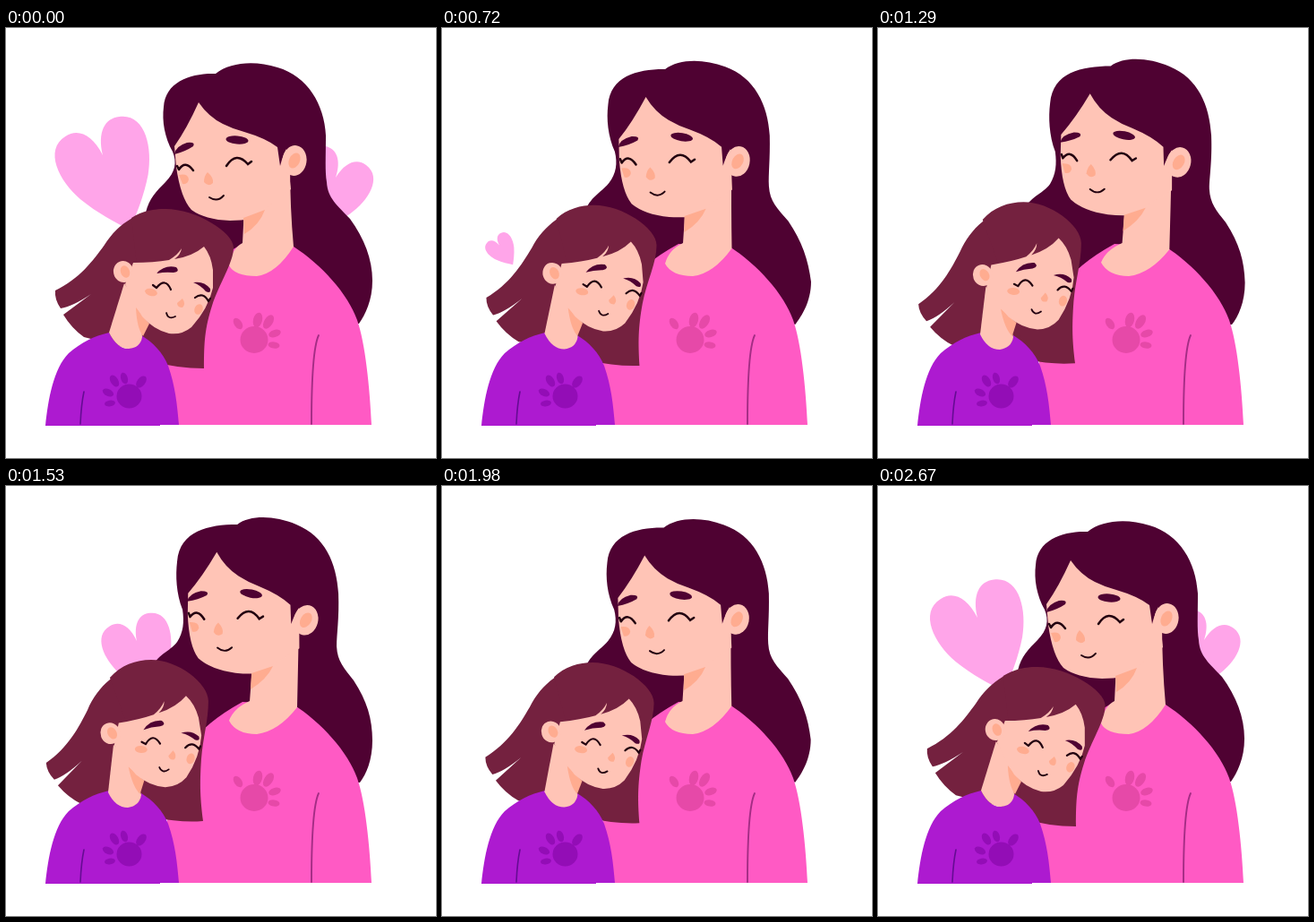
These frames come from a looping animation (480x480 px, 2700 ms). An HTML page with a canvas:

```html
<!DOCTYPE html>
<html lang="en">
<head>
<meta charset="utf-8">
<title>Hug</title>
<style>
  html, body { margin: 0; width: 100%; height: 100%; overflow: hidden; background: #fff; }
  canvas { display: block; width: 480px; height: 480px; }
</style>
</head>
<body>
<canvas id="stage" width="480" height="480"></canvas>
<script>
const ctx = document.getElementById('stage').getContext('2d');
const LOOP = 2700, STEP = 30;
const C = {
  heart: '#ffa5e9', hair: '#4f0232', brown: '#74213f', skin: '#ffc4b6', blush: '#ffac90',
  pink: '#ff5ac4', pinkPaw: '#e649a8', pinkLine: '#a32d84',
  purple: '#ad1ad0', purplePaw: '#930db6', purpleLine: '#650c93', ink: '#22000f'
};

const HEART = 'M0 0C-3 -26 -16 -38 -32 -34C-60 -28 -56 10 -40 38C-28 58 -12 76 0 88' +
              'C12 76 28 58 40 38C56 10 60 -28 32 -34C16 -38 3 -26 0 0Z';

// tilt in degrees, then steps of time, x, y, scale
const hearts = [
  [-20, [2150, 150, 235, .5], [2340, 143, 196, .93], [2670, 111, 147, .99], [2700, 108, 142, 1], [2790, 98, 125, 1], [2950, 88, 100, 0]],
  [25, [2400, 345, 200, .5], [2670, 364, 172, .76], [2700, 368, 167, .79], [2730, 371, 163, .78], [2880, 378, 150, 0]],
  [-35, [2200, 130, 262, .3], [2340, 110, 247, .42], [2500, 95, 235, 0]],
  [-35, [300, 115, 290, .3], [420, 89, 276, .4], [560, 72, 258, .6], [640, 68, 250, .6], [800, 60, 235, 0]],
  [-18, [1350, 155, 215, .3], [1530, 146, 173, .74], [1620, 137, 154, .82], [1800, 122, 125, 0]]
];

const MOM_HAIR = [
  'M234 51C206 50 178 60 176 88C174 104 177 122 186 138C191 150 189 161 178 172C168 182 160 190 156 206L140 250L260 330L394 330C401 320 409 304 409 282C409 258 400 235 384 213C370 198 359 190 358 172C356 160 357 145 357 120C355 85 337 54 303 44C278 36 250 38 234 51Z',
  'M258 43C226 43 194 50 191 84C189 100 190 120 197 138C199 152 198 163 191 174C183 185 168 188 161 206L150 250L260 330L395 331C402 322 409 306 409 284C409 260 403 240 388 217C377 203 370 196 369 179C369 165 372 148 371 120C369 86 356 56 324 43C300 33 273 32 258 43Z'
];
const MOM_NECK = [
  'M266 200L264 240Q252 246 249 265Q255 277 280 277Q302 274 321 244Q317 200 317 150Z',
  'M275 200L272 240Q254 248 249 262Q257 277 280 277Q304 274 325 247Q326 200 327 150Z'
];
const MOM_SHADE = [
  'M265 212L289 203Q283 220 266 230Z',
  'M274 209L298 201Q291 216 273 227Z'
];
const GIRL_LOCK = [
  'M140 212C152 204 166 202 178 202C212 202 254 228 254 245C254 262 238 285 230 310C222 335 221 350 221 380Q190 380 165 372L150 300Z',
  'M116 214C128 200 145 194 162 194C192 194 226 220 226 240C226 262 220 280 218 305C216 335 217 350 220 374Q195 376 165 370L146 296Z'
];
const GIRL_NECK = [
  'M132 285L115 340Q124 358 137 358Q150 357 152 345L150 310Z',
  'M120 289L114 342Q122 359 136 359Q149 357 151 345L141 308Z'
];

const fill = (d, color) => { ctx.fillStyle = color; ctx.fill(new Path2D(d)); };
const line = (d, color, w) => {
  ctx.strokeStyle = color; ctx.lineWidth = w; ctx.lineCap = 'round';
  ctx.stroke(new Path2D(d));
};
const oval = (color, x, y, rx, ry, deg = 0) => {
  ctx.fillStyle = color;
  ctx.beginPath();
  ctx.ellipse(x, y, rx, ry, deg * Math.PI / 180, 0, Math.PI * 2);
  ctx.fill();
};
const turned = (x, y, angle, draw) => {
  ctx.save();
  ctx.translate(x, y); ctx.rotate(angle); ctx.translate(-x, -y);
  draw();
  ctx.restore();
};
const morph = ([a, b], k) => {
  const to = b.match(/-?[\d.]+/g);
  let i = 0;
  return a.replace(/-?[\d.]+/g, n => (+n + (to[i++] - n) * k).toFixed(2));
};
const ease = p => (1 - Math.cos(Math.PI * p)) / 2;
const there = (t, peak) => t < peak ? t / peak : (LOOP - t) / (LOOP - peak);

function drawHeart(t, [tilt, ...keys]) {
  const last = keys[keys.length - 1][0];
  if (t < last - LOOP) t += LOOP;
  if (t < keys[0][0] || t >= last) return;
  const i = keys.findIndex(k => k[0] > t);
  const a = keys[i - 1], b = keys[i], p = (t - a[0]) / (b[0] - a[0]);
  const [, x, y, s] = a.map((v, n) => v + (b[n] - v) * p);
  ctx.save();
  ctx.translate(x, y); ctx.rotate(tilt * Math.PI / 180); ctx.scale(s, s);
  fill(HEART, C.heart);
  ctx.restore();
}

function momBody() {
  fill('M180 443V350L205 290Q222 264 264 241L321 244C352 264 382 297 392 326C401 352 406 400 408 443Z', C.pink);
  line('M341 442C341 400 342 358 349 343', C.pinkLine, 1.9);
  oval(C.pinkPaw, 277, 348, 15.5, 15);
  oval(C.pinkPaw, 259, 330, 4.2, 7, -35);
  oval(C.pinkPaw, 281, 326, 5, 8.5, 14);
  oval(C.pinkPaw, 293, 328, 4.8, 8.5, 32);
  oval(C.pinkPaw, 300, 341, 4, 7, 72);
  oval(C.pinkPaw, 299, 354, 3.6, 6.5, 98);
}

function momHead() {
  fill('M215 83Q226 99 242 107Q254 113 266 116Q290 123 303 133L306 154Q309 142 313 135L318 180L275 213Q262 215 250 215Q222 214 207 203Q195 190 190 155L188 132Q202 112 215 83Z', C.skin);
  oval(C.skin, 322, 148, 13.5, 17, 8);
  oval(C.blush, 322, 148, 6, 9, 25);
  fill('M188 141Q189 132 202 128Q212 127 209 132Q200 138 188 141Z', C.hair);
  oval(C.hair, 258, 125, 12.5, 4.6, 5);
  line('M193 158Q200 147 209 159M193 158L191 154', C.ink, 2.5);
  line('M246 154Q257 137 270 152L274 149', C.ink, 2.5);
  fill('M225 161Q232 167 231 173Q226 178 221 172Q221 165 225 161Z', C.blush);
  fill('M193 164Q203 162 204 169Q203 175 197 174Z', C.blush);
  line('M227 189Q236 195 243 187', C.ink, 1.9);
}

function girlHair() {
  fill('M55 293C82 280 97 260 110 242C126 217 150 203 178 202L195 330L165 365L87 345Q73 335 64 320L95 297Q74 311 61 313Q54 303 55 293Z', C.brown);
}

function girlBody() {
  fill('M44 444C47 415 53 380 70 363C84 351 98 344 115 340Q124 358 137 358Q150 356 151 343C164 351 175 362 181 377C189 400 191 420 193 443H172V444Z', C.purple);
  line('M83 442Q84 420 87 406', C.purpleLine, 1.6);
  oval(C.purplePaw, 137.5, 411, 14, 13.5);
  oval(C.purplePaw, 116, 419, 3.4, 6, 80);
  oval(C.purplePaw, 114, 407, 3.8, 6.5, -65);
  oval(C.purplePaw, 121, 394, 4.2, 7.2, -32);
  oval(C.purplePaw, 132, 391, 3.8, 6.5, -18);
  oval(C.purplePaw, 151, 395, 4.5, 7.5, 38);
}

function girlHead() {
  fill('M145 312L160 330L153 344Q146 335 145 312Z', C.blush);
  fill('M142 262Q165 262 182 259Q192 253 196 246Q195 253 188 258Q208 255 221 244Q229 254 231 270L231 290Q226 313 207 334Q196 343 182 341Q165 337 152 322Q143 308 133 286Z', C.skin);
  oval(C.skin, 131, 272, 11, 12, -12);
  oval(C.blush, 133, 272, 5, 7, -20);
  fill('M168 274Q177 264 190 267Q195 272 187 273Q177 272 168 274Z', C.hair);
  fill('M209 284Q221 282 228 291Q229 297 223 294Q217 287 209 284Z', C.hair);
  line('M168 290Q178 278 184 292M168 290L164 287', C.ink, 2.2);
  line('M211 301Q220 294 226 305M226 305L228 302', C.ink, 2.2);
  fill('M197 302Q201 308 197 312Q191 312 191 307Z', C.blush);
  oval(C.blush, 162, 295, 7, 4, 14);
  oval(C.blush, 215, 314, 4.5, 6, 25);
  line('M179 318Q181 326 189 322', C.ink, 1.8);
}

function render(t) {
  const lean = ease(there(t, 1300));
  const q = there(t, 1450), nod = (q + ease(q)) / 2;
  const momAngle = .113 * lean, girlAngle = -.165 * nod;
  const k = lean / .93, g = nod / .96;
  // the hair tip sways twice per loop
  const sway = 3 * Math.sin(Math.PI * (t < 1520 ? t / 1520 : (t - 1520) / 1180)) ** 2;

  ctx.fillStyle = '#fff';
  ctx.fillRect(0, 0, 480, 480);
  hearts.forEach(h => drawHeart(t, h));

  fill(morph(MOM_HAIR, k).replace(/\b409\.00/g, (409 + sway).toFixed(2)), C.hair);
  momBody();
  fill(morph(MOM_NECK, k), C.skin);
  turned(312, 270, momAngle, momHead);
  fill(morph(MOM_SHADE, k), C.blush);

  turned(150, 365, girlAngle, girlHair);
  fill(morph(GIRL_LOCK, g), C.brown);
  girlBody();
  fill(morph(GIRL_NECK, g), C.skin);
  turned(150, 365, girlAngle, girlHead);
}

const start = performance.now();
function tick() {
  const t = (performance.now() - start) % LOOP;
  render(Math.floor(t / STEP) * STEP);
  requestAnimationFrame(tick);
}
tick();
</script>
</body>
</html>
```
